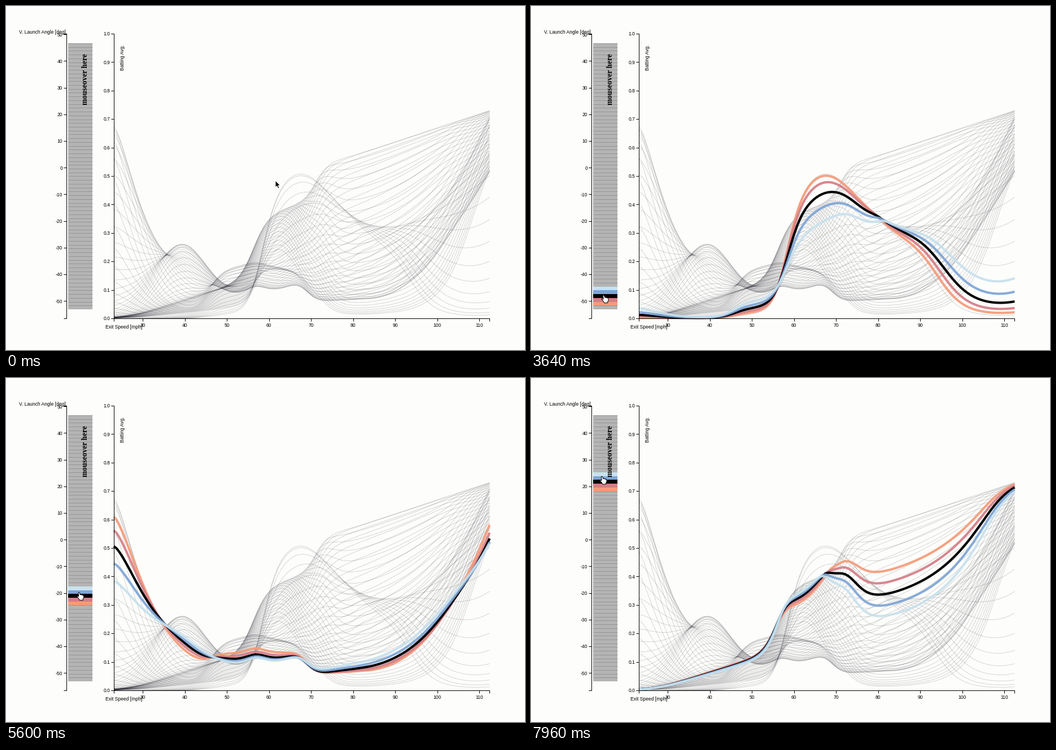
A matplotlib script that plays this animation: 919 by 609 pixels, repeating every 8 s.

```python
import numpy as np
import matplotlib.pyplot as plt
from matplotlib.animation import FuncAnimation
from matplotlib.collections import LineCollection
from matplotlib.patches import Polygon, Rectangle

W, H, DPI = 919, 609, 72          # at 72 dpi one point is one pixel
FRAMES, STEP = 200, 40
BANDS = 70
BAR_LEFT, BAR_RIGHT, BAR_TOP, BAR_BOTTOM = 110, 153, 66, 537
BAND_H = (BAR_BOTTOM - BAR_TOP) / BANDS

# Offset from the hovered band and its colour, in drawing order
HIGHLIGHTS = [(-2, "#f69b78"), (-1, "#d67d86"), (0, "#000000"),
              (1, "#7da5d6"), (2, "#c8e2ee")]

# Key points of the pointer tip: ms, x, y
PATH = np.array([
    (40, 477, 309), (760, 232, 478), (2120, 142, 562), (2720, 131, 548),
    (2760, 130, 526), (3480, 129, 520), (4200, 127, 482.5), (4480, 127, 455),
    (4840, 128, 455), (5160, 130, 430), (6080, 128, 324), (6760, 127, 256),
    (7000, 127, 256), (7680, 126, 180), (7920, 126, 180), (7960, 125.5, 174),
])
ARROW = np.array([(0, 0), (0, 12.2), (2.8, 9.7), (4.7, 14), (6.9, 13.1),
                  (5, 8.9), (8.6, 8.7)])
HAND = np.array([(-1.2, .9), (0, 0), (1.2, .8), (2.2, 4.4), (3.4, 3.8),
                 (4.6, 4.8), (5.8, 4.3), (6.8, 5.5), (8, 5.3), (8.7, 7),
                 (8.4, 10.2), (7.2, 12), (7.2, 14), (1.2, 14), (0, 11.6),
                 (-2.6, 8.6), (-3.6, 7.2), (-2.6, 6.3), (-.8, 7.6),
                 (-.4, 6)])


def rise(x, mid, w):
    """Smooth step from 0 to 1."""
    return 1 / (1 + np.exp(-(x - mid) / w))


def fall(x, mid, w):
    return 1 - rise(x, mid, w)


def bell(x, mid, left, right=None, power=2):
    """Bump of height 1 with its own width on each side."""
    width = np.where(x < mid, left, left if right is None else right)
    return np.exp(-(np.abs(x - mid) / width) ** power)


def topped_balls(b, s):
    """Slow hits at low angles, fading quickly with speed."""
    reach = 7.2 + .5 * np.maximum(b - 13, 0)
    return .675 * bell(b, 17, 7, 9.2) * np.exp(-((s - 23.1) / reach) ** 1.43)


def slow_hump(b, s):
    """The hump near 39 mph."""
    left = 9.3 - .25 * np.clip(b - 32, 0, 8)
    return .215 * bell(b, 34.5, 10.5, 7) * bell(s, 39, left, 8.3)


def shelf(b, s):
    """The flat stretch between 50 and 65 mph."""
    return .16 * bell(b, 14, 9, 7.5) * rise(s, 46, 1.8) * fall(s, 69, 3.5)


def low_ridge(b, s):
    """Ridge that starts at the lowest band and climbs with speed."""
    mid = 6.5 * rise(s, 80.5, 1.8) + .27 * np.maximum(s - 84, 0)
    left = 6.3 + 15 * fall(s, 89, 4)
    right = 6.3 + 4.2 * bell(s, 76.5, 7)
    height = (rise(s, 58, 1.7) * (.31 + .19 * bell(s, 67.5, 10.5))
              + .05 * rise(s, 108, 3))
    return height * bell(b, mid, left, right)


def main_ridge(b, s):
    """Line drives: a long ridge that narrows, then widens, with speed."""
    mid = (44.6 + 16.5 * fall(s, 67, 2.4) - 11 * fall(s, 58, 1.5)
           + 4 * rise(s, 108, 2.5))
    left = 12.7 + 13.5 * fall(s, 68.5, 1.5) + 9 * np.exp((s - 100) / 10.5)
    right = 10.3 + 7.5 * fall(s, 73, 2) + 5.3 * np.exp((s - 100) / 7)
    height = (.0144 * np.log1p(np.exp((s - 27) / 3))
              + .21 * rise(s, 56.3, 1.7) + .11 * rise(s, 71, 1.3))
    return height * bell(b, mid, left, right, 1.6) * rise(b, 6, 2)


def batting_avg(b, s):
    parts = (topped_balls, slow_hump, shelf, low_ridge, main_ridge)
    return np.clip(sum(part(b, s) for part in parts), 0, 1)


def speed_x(mph):
    return 191 + (mph - 23.15) * 7.455


def avg_y(avg):
    return 553 - avg * 504


def angle_y(deg):
    return 286.3 - deg * 4.72


def band_y(i):
    """Upper edge of a band; band 0 is the lowest."""
    return BAR_BOTTOM - (i + 1) * BAND_H


fig = plt.figure(figsize=((W + .01) / DPI, (H + .01) / DPI), dpi=DPI,
                 facecolor="#fdfdfb")
ax = fig.add_axes([0, 0, 1, 1])
ax.set(xlim=(0, W), ylim=(H, 0))
ax.axis("off")


def label(x, y, text, ha="left", size=8.5, **style):
    style.setdefault("family", "Liberation Sans")
    ax.text(x, y, text, ha=ha, va="baseline", fontsize=size, color="black",
            rotation_mode="anchor", zorder=8, **style)


# Curves
mph = np.linspace(23.15, 112.4, 134)
curve_x = speed_x(mph)
curves = avg_y(batting_avg(np.arange(BANDS)[:, None], mph[None, :]))
ax.add_collection(LineCollection(
    [np.column_stack([curve_x, c]) for c in curves],
    colors=[(.05, .05, .1, .18)], linewidths=.9, zorder=2))

# Angle strip
ax.add_patch(Rectangle((BAR_LEFT, BAR_TOP), BAR_RIGHT - BAR_LEFT,
                       BAR_BOTTOM - BAR_TOP, fc="#b4b4b4", lw=0, zorder=2))
ax.add_collection(LineCollection(
    [[(BAR_LEFT, band_y(i)), (BAR_RIGHT, band_y(i))] for i in range(BANDS)],
    colors="#8e8e8e", linewidths=.8, zorder=3))
label(143.7, 175, "mouseover here", size=13.5, rotation=90,
      family="Liberation Serif", weight="bold")

# Axes
rules = [[(102, 49), (107, 49), (107, 553), (102, 553)],
         [(186, 49), (191, 49), (191, 553), (186, 553)],
         [(191, 558), (191, 553), (856, 553), (856, 558)]]
for deg in range(-50, 51, 10):
    y = angle_y(deg)
    rules.append([(102, y), (107, y)])
    label(100, y + 3.2, str(deg), "right")
for tenth in range(11):
    y = avg_y(tenth / 10)
    rules.append([(186, y), (191, y)])
    label(184.5, y + 3.2, f"{tenth / 10:.1f}", "right")
for speed in range(30, 111, 10):
    x = speed_x(speed)
    rules.append([(x, 553), (x, 558)])
    label(x, 568, str(speed), "center")
ax.add_collection(LineCollection(rules, colors="black", linewidths=1,
                                 zorder=7))
label(106, 49, "V. Launch Angle [deg]", "right")
label(176, 571, "Exit Speed [mph]")
label(208.5, 113.5, "Batting Avg.", rotation=90)

# Moving parts
lines, bars = [], []
for order, (_, colour) in enumerate(HIGHLIGHTS):
    alpha = 1 if colour == "#000000" else .9
    lines += ax.plot([], [], color=colour, lw=4.2, alpha=alpha,
                     solid_capstyle="butt", zorder=4 + order / 10)
    bars.append(ax.add_patch(Rectangle(
        (BAR_LEFT, 0), BAR_RIGHT - BAR_LEFT, BAND_H, fc=colour, lw=0,
        zorder=4)))
pointer = ax.add_patch(Polygon(ARROW, closed=True, lw=1, joinstyle="round",
                               zorder=10))


def tip(ms):
    return np.array([np.interp(ms, PATH[:, 0], PATH[:, c]) for c in (1, 2)])


def on_strip(x, y):
    return BAR_LEFT <= x <= BAR_RIGHT and BAR_TOP <= y <= BAR_BOTTOM


def draw(n):
    ms = n * STEP
    spot = tip(ms)
    hand = on_strip(*spot)
    pointer.set_xy(spot + (HAND if hand else ARROW))
    pointer.set_facecolor("white" if hand else "black")
    pointer.set_edgecolor("black" if hand else "white")

    # The highlight trails the pointer by one step
    x, y = tip(ms - STEP) + (0, 2)
    active = on_strip(x, y)
    hovered = int((BAR_BOTTOM - y) / BAND_H)
    for (offset, _), line, bar in zip(HIGHLIGHTS, lines, bars):
        i = hovered + offset
        shown = active and 0 <= i < BANDS
        line.set_visible(shown)
        bar.set_visible(shown)
        if shown:
            line.set_data(curve_x, curves[i])
            bar.set_y(band_y(i))
    return [*lines, *bars, pointer]


anim = FuncAnimation(fig, draw, frames=FRAMES, init_func=lambda: draw(0),
                     interval=STEP, repeat=True, blit=False)
plt.show()
```
